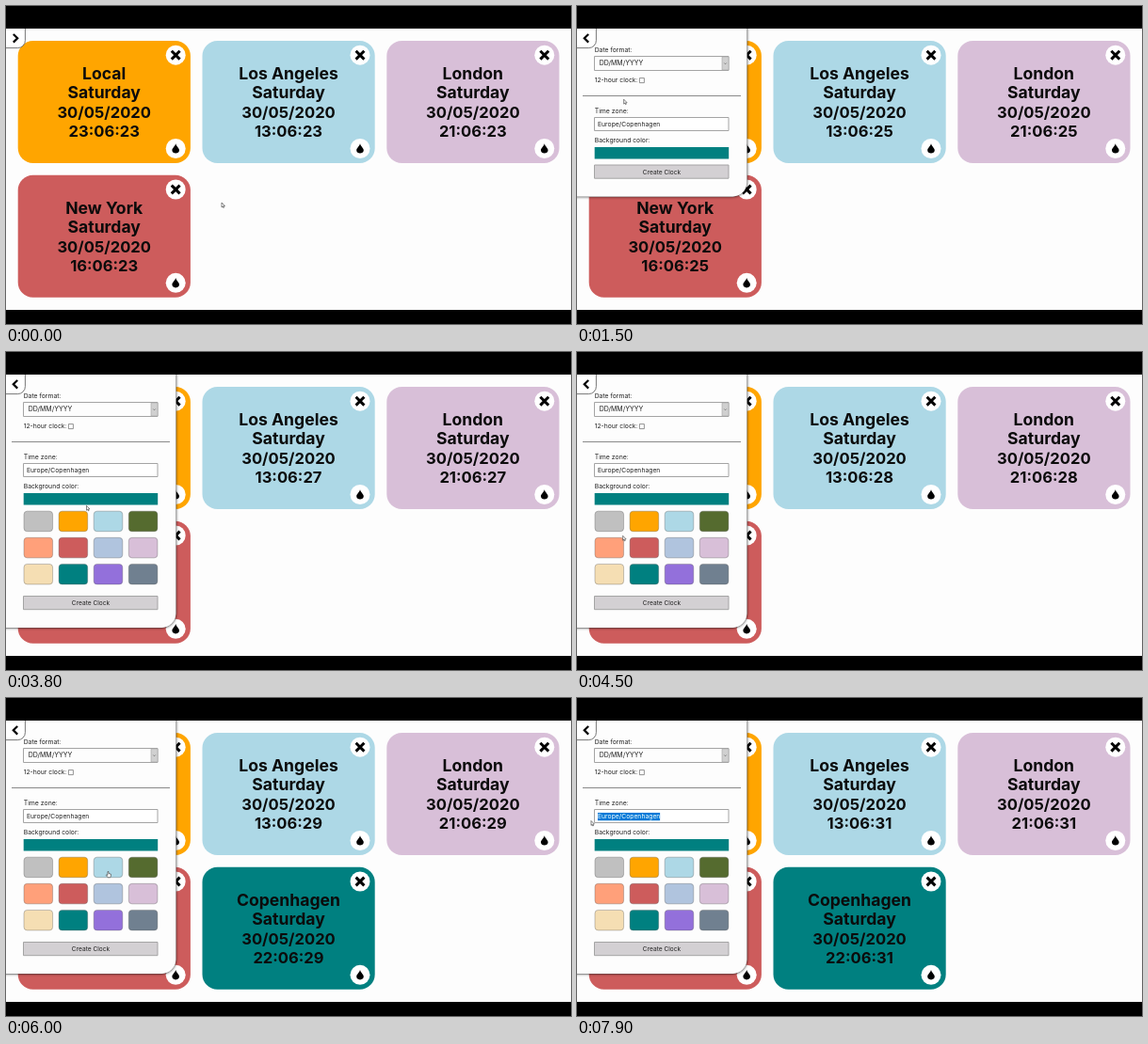
These frames come from a looping animation (600 by 338 pixels, 8 s). An HTML page with a canvas:

```html
<!DOCTYPE html>
<html lang="en">
<head>
<meta charset="utf-8">
<title>World clocks</title>
<style>
html, body { margin: 0; width: 100%; height: 100%; overflow: hidden; background: #000; }
canvas { display: block; width: 600px; height: 338px; }
</style>
</head>
<body>
<canvas id="stage"></canvas>
<script>
const LOOP = 8000;
const canvas = document.getElementById('stage');
const ctx = canvas.getContext('2d');
const dpr = window.devicePixelRatio || 1;
canvas.width = 600 * dpr;
canvas.height = 338 * dpr;

const FONT = 'Inter, "Open Sans", sans-serif';
const WHITE = '#fdfdfd';
const INK = '#222';
const BORDER = '#a4a4a4';
const swatches = ['silver', 'orange', 'lightblue', 'darkolivegreen',
  'lightsalmon', 'indianred', 'lightsteelblue', 'thistle',
  'wheat', 'teal', 'mediumpurple', 'slategray'];
const clocks = [
  { name: 'Local', hour: 23, color: 'orange', x: 12.7, y: 37 },
  { name: 'Los Angeles', hour: 13, color: 'lightblue', x: 208.5, y: 37 },
  { name: 'London', hour: 21, color: 'thistle', x: 404.3, y: 37 },
  { name: 'New York', hour: 16, color: 'indianred', x: 12.7, y: 179.8 },
  { name: 'Copenhagen', hour: 22, color: 'teal', x: 208.5, y: 179.8, from: 5750 }
];
// time, x, y, pointer shape from that time on
const route = [
  [0, 229, 209, 'arrow'], [250, 229, 209, 'arrow'], [800, 13, 36, 'hand'],
  [1150, 13, 36, 'arrow'], [1480, 49.7, 99.2, 'arrow'], [2100, 49.7, 99.2, 'arrow'],
  [2800, 90.5, 159, 'hand'], [3650, 90.5, 159, 'arrow'], [4350, 48.7, 195.3, 'arrow'],
  [4700, 48.7, 195.3, 'arrow'], [5300, 93.3, 264, 'hand'], [5720, 93.3, 264, 'arrow'],
  [5970, 108, 184.5, 'hand'], [6080, 108, 184.5, 'arrow'], [6480, 91, 127, 'beam'],
  [6650, 91, 127, 'beam'], [7150, 15, 130.5, 'arrow'], [LOOP, 15, 130.5, 'arrow']
];

const clamp = v => Math.max(0, Math.min(1, v));
const ease = v => v * v * (3 - 2 * v);
const progress = (t, a, b) => ease(clamp((t - a) / (b - a)));

function box(x, y, w, h, r, fill, stroke, line = 1) {
  ctx.beginPath();
  ctx.roundRect(x, y, w, h, r);
  if (fill) { ctx.fillStyle = fill; ctx.fill(); }
  if (stroke) { ctx.strokeStyle = stroke; ctx.lineWidth = line; ctx.stroke(); }
}

function text(str, x, y, size, weight = 400, align = 'left', color = INK) {
  ctx.font = `${weight} ${size}px ${FONT}`;
  ctx.textAlign = align;
  ctx.fillStyle = color;
  ctx.fillText(str, x, y);
}

function lines(points, color, width) {
  ctx.beginPath();
  points.forEach(([x, y], i) => i ? ctx.lineTo(x, y) : ctx.moveTo(x, y));
  ctx.strokeStyle = color;
  ctx.lineWidth = width;
  ctx.stroke();
}

function disc(x, y) {
  ctx.beginPath();
  ctx.arc(x, y, 10.5, 0, Math.PI * 2);
  ctx.fillStyle = '#fff';
  ctx.fill();
}

function drawClock(c, sec) {
  box(c.x, c.y, 183.2, 130, 16, c.color);
  const mid = c.x + 91.5;
  const rows = [c.name, 'Saturday', '30/05/2020', `${c.hour}:06:${sec}`];
  rows.forEach((row, i) =>
    text(row, mid, c.y + 40.9 + i * 20.5, i < 2 ? 17.6 : 16.6, 700, 'center', '#0b0b0b'));

  const x = c.x + 167.5, top = c.y + 15.2, low = c.y + 114.5;
  disc(x, top);
  lines([[x - 4.4, top - 4.4], [x + 4.4, top + 4.4]], '#000', 3);
  lines([[x + 4.4, top - 4.4], [x - 4.4, top + 4.4]], '#000', 3);
  disc(x, low);
  ctx.beginPath();
  ctx.moveTo(x, low - 5.3);
  ctx.bezierCurveTo(x + 1, low - 2, x + 3.8, low - 0.5, x + 3.8, low + 1.8);
  ctx.bezierCurveTo(x + 3.8, low + 6.2, x - 3.8, low + 6.2, x - 3.8, low + 1.8);
  ctx.bezierCurveTo(x - 3.8, low - 0.5, x - 1, low - 2, x, low - 5.3);
  ctx.fillStyle = '#000';
  ctx.fill();
}

function drawPanel(t) {
  const shown = progress(t, 1000, 1350);
  if (!shown) return;
  const grow = progress(t, 3300, 3580) * 90.5;
  const hover = t >= 5200 && t < 5780;

  ctx.save();
  ctx.translate(-184 * (1 - shown), 0);
  ctx.save();
  ctx.shadowColor = 'rgba(0,0,0,0.75)';
  ctx.shadowBlur = 3 * dpr;
  box(-4, 20, 184.3, 182.5 + grow, [0, 0, 15, 0], WHITE, '#555', 0.5);
  ctx.restore();
  box(-4, 20, 184.3, 182.5 + grow, [0, 0, 15, 0], WHITE);

  text('Date format:', 18.7, 48.8, 6.8);
  box(18.5, 53.5, 142.5, 15, 0, WHITE, BORDER);
  box(154, 54, 7, 14, 0, '#d0d0d0', BORDER, 0.6);
  lines([[156.3, 60.5], [157.5, 61.8], [158.7, 60.5]], '#555', 0.6);
  text('DD/MM/YYYY', 23.7, 63.4, 7);
  text('12-hour clock:', 18.7, 81, 6.8);
  box(66.4, 76.6, 5, 5, 0, '#fff', '#666', 0.7);
  lines([[6, 95.5], [174, 95.5]], '#8a8a8a', 1);

  text('Time zone:', 18.7, 114, 6.9);
  box(18.5, 118.5, 142.5, 14, 0, '#fff', BORDER);
  const zone = 'Europe/Copenhagen';
  text(zone, 22, 128.2, 6.8);
  const drag = progress(t, 6650, 7150);
  if (drag) {
    const end = 22 + ctx.measureText(zone).width;
    const start = Math.max(22, 91 - 76 * drag);
    if (start < end) {
      ctx.save();
      ctx.beginPath();
      ctx.rect(start, 121.8, end - start, 8.6);
      ctx.clip();
      box(start, 121.8, end - start, 8.6, 0, '#0078d7');
      text(zone, 22, 128.2, 6.8, 400, 'left', '#fff');
      ctx.restore();
    }
  }

  text('Background color:', 18.7, 145.3, 6.8);
  box(18.7, 150, 142.5, 12.5, 0, 'teal');

  if (grow) {
    ctx.save();
    ctx.beginPath();
    ctx.rect(0, 163, 180, grow);
    ctx.clip();
    swatches.forEach((color, i) => {
      const x = 19 + (i % 4) * 37.1, y = 169.2 + Math.floor(i / 4) * 28.1;
      box(x, y, 30.6, 21.5, 3.5, color, 'rgba(90,90,90,0.6)', 0.6);
    });
    ctx.restore();
  }

  box(18.5, 169 + grow, 142.5, 14.2, 0, hover ? '#fff' : '#d3d0d3', BORDER);
  text('Create Clock', 90, 178.6 + grow, 6.6, 400, 'center');
  ctx.restore();
}

function drawToggle(t) {
  box(-4, 20, 24.4, 24.6, [0, 0, 8, 0], '#fff', '#555', 0.8);
  const d = t < 1050 ? 1 : -1;
  lines([[10 - 2.2 * d, 30], [10 + 2.2 * d, 34.3], [10 - 2.2 * d, 38.6]], '#000', 2.2);
}

function shape(points) {
  ctx.beginPath();
  points.forEach(([x, y], i) => i ? ctx.lineTo(x, y) : ctx.moveTo(x, y));
  ctx.closePath();
  ctx.fillStyle = '#fff';
  ctx.fill();
  ctx.strokeStyle = '#333';
  ctx.lineWidth = 0.6;
  ctx.stroke();
}

function drawPointer(t) {
  let i = 0;
  while (i < route.length - 2 && t >= route[i + 1][0]) i++;
  const [a, x0, y0, kind] = route[i];
  const [b, x1, y1] = route[i + 1];
  const k = progress(t, a, b);
  ctx.save();
  ctx.translate(x0 + (x1 - x0) * k, y0 + (y1 - y0) * k);
  if (kind === 'arrow') {
    shape([[0, 0], [0, 4.9], [1.1, 3.9], [1.8, 5.5], [2.6, 5.1], [1.9, 3.6], [3.4, 3.5]]);
  } else if (kind === 'hand') {
    shape([[0, 0], [0.9, 0], [1, 2], [3.4, 2.7], [3.4, 4.6], [2.8, 6.2],
      [0, 6.2], [-1.7, 3.8], [-1.2, 3.2], [-0.1, 4]]);
  } else {
    lines([[0, -3.5], [0, 3.5]], '#333', 0.6);
    lines([[-1, -3.5], [1, -3.5]], '#333', 0.5);
    lines([[-1, 3.5], [1, 3.5]], '#333', 0.5);
  }
  ctx.restore();
}

function draw(t) {
  ctx.setTransform(dpr, 0, 0, dpr, 0, 0);
  ctx.fillStyle = '#000';
  ctx.fillRect(0, 0, 600, 338);
  ctx.save();
  ctx.beginPath();
  ctx.rect(0, 24, 600, 299);
  ctx.clip();
  ctx.fillStyle = WHITE;
  ctx.fillRect(0, 24, 600, 299);
  const sec = 23 + Math.floor((t + 700) / 1000);
  clocks.forEach(c => { if (t >= (c.from || 0)) drawClock(c, sec); });
  drawPanel(t);
  drawToggle(t);
  drawPointer(t);
  ctx.restore();
}

const begin = performance.now();
function frame() {
  draw((performance.now() - begin) % LOOP);
  requestAnimationFrame(frame);
}
frame();
</script>
</body>
</html>
```
